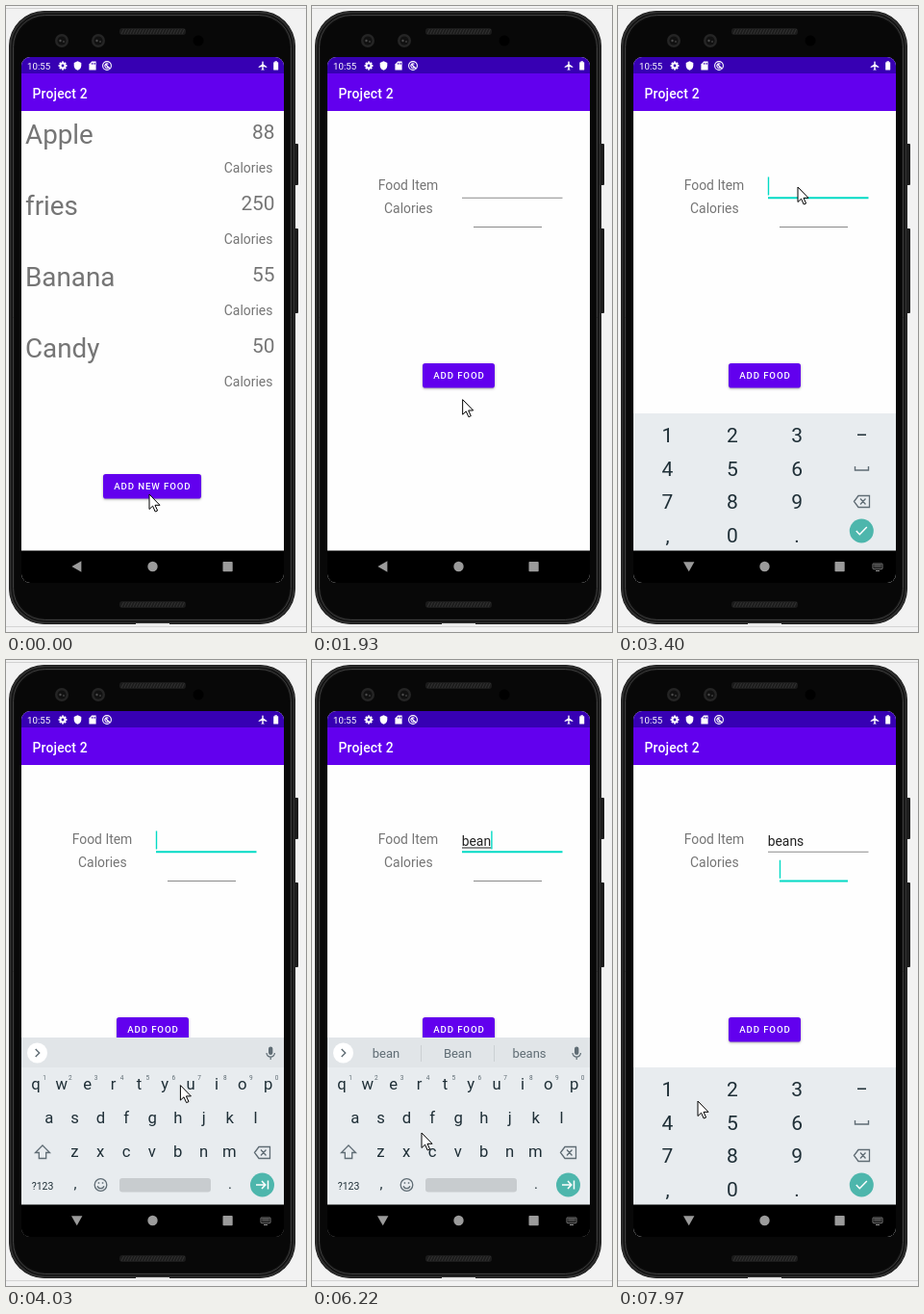
An HTML page with a canvas for the animation above (8000 ms loop, 312 by 650 pixels).

```html
<!DOCTYPE html>
<html lang="en">
<head>
<meta charset="utf-8">
<title>Food list app</title>
<style>
  html, body { margin: 0; width: 100%; height: 100%; overflow: hidden; background: #f2f2f2; }
  canvas { display: block; width: 312px; height: 650px; }
</style>
</head>
<body>
<canvas id="stage"></canvas>
<script>
const LOOP = 8000;
const PURPLE = '#6200ee', TEAL = '#03dac5', GREY = '#757575', KEY = '#1f2f37', ICON = '#5f6c74';
const ratio = window.devicePixelRatio || 1;
const canvas = document.getElementById('stage');
const layer = document.createElement('canvas');
for (const surface of [canvas, layer]) {
  surface.width = 312 * ratio;
  surface.height = 650 * ratio;
  surface.getContext('2d').scale(ratio, ratio);
}
let c = canvas.getContext('2d');

// ---- drawing helpers ----
function rect(x, y, w, h, color, r = 0) {
  c.fillStyle = color;
  c.beginPath();
  c.roundRect(x, y, w, h, r);
  c.fill();
}
function frame(x, y, w, h, color, width, r) {
  c.strokeStyle = color;
  c.lineWidth = width;
  c.beginPath();
  c.roundRect(x, y, w, h, r);
  c.stroke();
}
function circle(x, y, r, color) {
  c.fillStyle = color;
  c.beginPath();
  c.arc(x, y, r, 0, 7);
  c.fill();
}
function text(str, x, y, size, color, align = 'left', weight = 400, spacing = 0) {
  c.font = `${weight} ${size}px Roboto, sans-serif`;
  c.letterSpacing = spacing + 'px';
  c.textAlign = align;
  c.fillStyle = color;
  c.fillText(str, x, y);
}
// Path relative to (x, y); stroked when a width is given
function icon(x, y, d, color, width = 0) {
  c.save();
  c.translate(x, y);
  c.lineWidth = width;
  c.fillStyle = c.strokeStyle = color;
  if (width) c.stroke(new Path2D(d)); else c.fill(new Path2D(d));
  c.restore();
}
function clipTo(x, y, w, h, r) {
  c.beginPath();
  c.roundRect(x, y, w, h, r);
  c.clip();
}
// Draws a whole window, zoomed about the screen centre and faded as one
function zoomed(scale, alpha, draw) {
  const main = c;
  c = layer.getContext('2d');
  c.clearRect(0, 0, 312, 650);
  c.save();
  c.translate(152.5, 326);
  c.scale(scale, scale);
  c.translate(-152.5, -326);
  clipTo(16, 53, 273, 546, 0);
  draw();
  c.restore();
  c = main;
  c.globalAlpha = alpha;
  c.drawImage(layer, 0, 0, 312, 650);
  c.globalAlpha = 1;
}

// ---- phone ----
function grille(y) {
  rect(118, y, 69, 7, '#1b1b1b', 3);
  for (let x = 120; x < 186; x += 3) icon(x, y + 1, 'M0 5L2.5 0', '#3a3a3a', 0.8);
}
function phone() {
  rect(0, 0, 312, 650, '#f2f2f2');
  rect(0, 2, 312, 1, '#d0d0d0');
  rect(0, 644, 312, 1, '#d4d4d4');
  rect(300, 143, 4, 43, '#1c1c1c', 1);
  rect(300, 231, 4, 88, '#1c1c1c', 1);
  rect(3, 5, 298, 637, '#111', 37);
  frame(4.5, 6.5, 295, 634, '#2e2e2e', 2, 36);
  frame(7.5, 9.5, 289, 628, '#4a4a4a', 0.8, 33);
  rect(9, 11, 286, 625, '#080808', 32);
  rect(135, 641, 35, 2, '#e6e6e6');
  grille(23);
  grille(618);
  for (const x of [58, 96]) {
    circle(x, 36, 7, '#252525');
    circle(x, 36, 4.5, '#111');
    circle(x - 1.5, 36, 1.2, '#4c4c4c');
    circle(x + 2, 37, 1, '#3c3c3c');
  }
  circle(200, 36, 5.5, '#000');
}

// ---- app windows ----
function appWindow() {
  rect(16, 53, 273, 546, '#fefefe');
  rect(16, 53, 273, 17.5, '#3700b3');
  rect(16, 70, 273, 39, PURPLE);
  text('Project 2', 27.5, 95.8, 13.9, '#fff', 'left', 500, 0.2);
  rect(16, 565.5, 273, 34, '#000');
}
function button(label, x, y, w, ripple = 0) {
  c.save();
  c.shadowColor = 'rgba(0,0,0,.35)';
  c.shadowBlur = (ripple ? 5 : 2.5) * ratio;
  c.shadowOffsetY = (ripple ? 2 : 1) * ratio;
  rect(x, y, w, 25.5, PURPLE, 2.8);
  c.restore();
  if (ripple) {
    c.save();
    clipTo(x, y, w, 25.5, 2.8);
    circle(149, 507, ripple, 'rgba(255,255,255,.24)');
    c.restore();
  }
  text(label, x + w / 2 + 0.4, y + 16.4, 9.7, '#fff', 'center', 500, 0.87);
}
function listWindow(ripple) {
  appWindow();
  [['Apple', 88], ['fries', 250], ['Banana', 55], ['Candy', 50]].forEach(([food, calories], i) => {
    const y = 74 * i;
    text(food, 20, 142.7 + y, 27.8, GREY);
    text(calories, 279.5, 138 + y, 20.8, GREY, 'right');
    text('Calories', 277.3, 172.6 + y, 13.9, GREY, 'right');
  });
  button('ADD NEW FOOD', 101, 486, 102, ripple);
}
function field(x, w, y, focused, value) {
  rect(x, focused ? y - 1 : y - 0.5, w, focused ? 2 : 1, focused ? TEAL : '#8a8a8a');
  text(value, x - 0.3, y - 6.3, 13.9, '#212121');
  if (!focused) return;
  const end = c.measureText(value).width;
  rect(x, y - 4.8, end, 1, '#212121');
  rect(x + end - 0.2, y - 21.8, 1.4, 19, TEAL);
}
function formWindow(focus, value) {
  appWindow();
  text('Food Item', 100, 191.4, 13.9, GREY, 'center');
  text('Calories', 100.3, 215, 13.9, GREY, 'center');
  field(156, 104.5, 199.3, focus === 'food', value);
  field(168, 71, 229.5, focus === 'calories', '');
  button('ADD FOOD', 115, 371, 75);
}

// ---- keyboards ----
function backspace(x, y) {
  icon(x, y, 'M-8 0L-3.5-6H8V6H-3.5ZM-1.5-3L4 3M4-3L-1.5 3', ICON, 1.3);
}
function numberPad() {
  rect(16, 423, 273, 177, '#e8ecef');
  ['123', '456', '789', ',0.'].forEach((row, r) => [...row].forEach((key, i) =>
    text(key, 51.5 + 67.3 * i, 453 + 34.6 * r, 21, KEY, 'center')));
  rect(249, 444.5, 9, 1.6, KEY);
  icon(253.5, 480, 'M-7-2V2H7V-2', ICON, 1.4);
  backspace(253.5, 514.5);
  circle(253.3, 545, 12.5, '#4db6ac');
  icon(253.3, 545, 'M-5.5 0L-2 3.7L5.5-4', '#fff', 1.5);
}
const ROWS = [['qwertyuiop', 31, 446], ['asdfghjkl', 44.7, 481], ['zxcvbnm', 71.3, 516]];
function letterKeys(words, pressed) {
  rect(16, 392, 273, 174, '#e8ecef');
  rect(16, 392, 273, 31, '#e1e5e8');
  circle(32.5, 408, 10.5, '#fff');
  icon(32.5, 408, 'M-1.8-4L2.2 0L-1.8 4', ICON, 1.4);
  words.forEach((word, i) => text(word, 77 + 74.5 * i, 412.8, 13, ICON, 'center'));
  if (words.length) for (const x of [113, 189]) rect(x, 400, 1, 17, '#cbd0d3');
  rect(273, 401.5, 4.4, 8.5, ICON, 2.2);
  icon(275.2, 408, 'M-4.2 0A4.2 4.2 0 0 0 4.2 0M0 4V7', ICON, 1.2);
  for (const [row, x0, y] of ROWS) [...row].forEach((key, i) => {
    const x = x0 + 26.85 * i;
    if (key === pressed) rect(x - 13, y - 22, 26, 35, '#d3d8db', 3);
    text(key, x, y, 16.7, KEY, 'center');
    if (y === 446) text((i + 1) % 10, x + 9, 435.5, 6.5, ICON, 'center');
  });
  icon(38, 511, 'M0-7L7.5 0.5H3.7V6.5H-3.7V0.5H-7.5Z', ICON, 1.3);
  backspace(266.5, 511.5);
  text('?123', 38, 549.5, 10.5, KEY, 'center');
  text(',', 72, 549, 15, KEY, 'center');
  text('.', 233, 549, 15, KEY, 'center');
  icon(98.5, 545, 'M6.3 0A6.3 6.3 0 1 1-6.3 0A6.3 6.3 0 1 1 6.3 0M-3.4 1.3A3.6 3.6 0 0 0 3.4 1.3M-2.8-2h1.5M1.3-2h1.5', ICON, 1.3);
  rect(118, 538, 95, 14.5, '#c8cccf', 3);
  circle(266.5, 545, 12.5, '#4db6ac');
  icon(266.5, 545, 'M-6.5 0H3M-0.5-4L3.3 0L-0.5 4M6-4.5V4.5', '#fff', 1.5);
}

// ---- system bars ----
function statusBar() {
  text('10:55', 22, 66, 9.7, '#fff');
  for (let a = 0; a < 4; a++) {
    const dx = 4.4 * Math.cos(a * Math.PI / 4), dy = 4.4 * Math.sin(a * Math.PI / 4);
    icon(59, 62, `M${-dx} ${-dy}L${dx} ${dy}`, '#fff', 2);
  }
  circle(59, 62, 3.5, '#fff');
  circle(59, 62, 1.4, '#3700b3');
  icon(74.5, 62, 'M0-4.7L3.8-3V0Q3.6 3.4 0 4.8Q-3.6 3.4-3.8 0V-3Z', '#fff');
  icon(90, 62, 'M-3.6-1.6L-0.8-4.4H3.6V4.4H-3.6Z', '#fff');
  for (const x of [88.8, 90.5, 92]) rect(x, 59, 0.8, 1.8, '#3700b3');
  icon(105, 62, 'M4.4 0A4.4 4.4 0 1 1-4.4 0A4.4 4.4 0 1 1 4.4 0M2 1A2.2 2.2 0 1 1 1.5-1.6M-1.5-1.5L3 3', '#fff', 1.1);
  icon(267, 62, 'M-0.7-4.2Q0-5 0.7-4.2V-1.4L4.3 1V2L0.7 0.9V3.2L1.8 4.4H-1.8L-0.7 3.2V0.9L-4.3 2V1L-0.7-1.4Z', '#fff');
  rect(278.2, 58.2, 5, 8.4, '#fff', 0.6);
  rect(279.5, 57.2, 2.4, 1.5, '#fff');
}
// turn: 0 = back arrow, 1 = arrow pointing down while a keyboard is open
function navBar(turn, color) {
  c.save();
  c.translate(73.7, 582);
  c.rotate(-turn * Math.PI / 2);
  icon(0, 0, 'M-5.3 0L4.7-5.7V5.7Z', color);
  c.restore();
  circle(152.5, 582, 5.2, color);
  rect(225.5, 577, 10.2, 10.2, color, 0.8);
  if (turn) {
    frame(265, 579, 10, 5.6, color, 0.8, 0.5);
    icon(270, 580.7, 'M-3.8 0H3.8M-3.8 1.6H3.8', color, 0.8);
    rect(268, 586, 4, 1, color);
  }
}

// ---- timeline ----
// The screen updates eight times between consecutive marks
const MARKS = [1540, 2590, 3640, 4690, 5830, 6920, 7970, 9020];
function tickAt(t) {
  if (t < 1540) return t < 1120 ? -3 : t < 1270 ? -2 : -1;
  const i = MARKS.findLastIndex(mark => mark <= t);
  return 8 * i + Math.floor(8 * (t - MARKS[i]) / (MARKS[i + 1] - MARKS[i]) + 0.15);
}
// Pointer stops: tick, x, y
const POINTER = [
  [0, 149, 507], [2, 149, 507], [5, 172, 212], [7, 174, 211], [8, 177, 195], [11, 187, 188],
  [15, 187, 188], [20, 180, 505], [23, 180, 508], [25, 88, 445], [27, 86, 444], [29, 44, 474],
  [30, 44, 474], [32, 203, 510], [33, 203, 510], [35, 114, 491], [36, 72, 476], [38, 72, 476],
  [41, 178, 212], [45, 178, 212], [47, 109, 387], [48, 83, 458]
];
function pointer(tick) {
  const n = Math.min(48, Math.max(0, tick));
  const i = Math.max(1, POINTER.findIndex(stop => stop[0] >= n));
  const [n0, x0, y0] = POINTER[i - 1], [n1, x1, y1] = POINTER[i];
  const f = (n - n0) / (n1 - n0);
  const x = x0 + (x1 - x0) * f, y = y0 + (y1 - y0) * f;
  const arrow = 'M0 0V15.5L3.6 12.2L6.2 18L8.6 17L6 11.3H11Z';
  icon(x, y, arrow, '#fff');
  icon(x, y, arrow, '#000', 1);
}
// Tick at which each letter lands, and the suggestions that follow
const TYPING = [
  [15, '', []], [22, 'b', ['b', 'be', 'but']], [27, 'be', ['be', 'been', 'best']],
  [30, 'bea', ['bea', 'bear', 'beach']], [33, 'bean', ['bean', 'Bean', 'beans']],
  [37, 'beans', ['beans', 'Beans', 'bean']]
];
const PAD_RISES = 8, FOOD_FOCUS = 12, LETTERS_OPEN = 15, CALORIES_FOCUS = 42;

function formScreen(n) {
  const [, value, words] = TYPING.findLast(step => step[0] <= n) || TYPING[0];
  const next = TYPING.find(step => step[0] === n + 1);
  const focus = n >= CALORIES_FOCUS ? 'calories' : n >= FOOD_FOCUS ? 'food' : n >= 6 ? 'calories' : '';
  formWindow(focus, value);
  if (n === PAD_RISES) {
    rect(16, 565.5, 273, 34, '#fefefe');
    c.save();
    c.translate(0, 34);
    c.globalAlpha = 0.65;
    numberPad();
    c.restore();
    rect(16, 565.5, 273, 34, 'rgba(0,0,0,.4)');
  } else if (n > PAD_RISES) {
    if (n >= LETTERS_OPEN && n < CALORIES_FOCUS) letterKeys(words, next && next[1].slice(-1));
    else numberPad();
    rect(16, 565.5, 273, 34, '#000');
  }
}
function render(t) {
  const n = tickAt(t);
  phone();
  c.save();
  clipTo(16, 53, 273, 546, 9);
  if (n < 0) listWindow([0, 45, 110][n + 3]);
  else if (n === 0) {
    zoomed(1.0355, 1, () => listWindow(0));
    zoomed(0.957, 0.8, () => formWindow('', ''));
  } else if (n === 1) {
    rect(16, 53, 273, 546, '#000');
    zoomed(0.99, 1, () => formWindow('', ''));
  } else formScreen(n);
  statusBar();
  if (n === 0) rect(16, 574, 273, 26, '#000');
  navBar(n < PAD_RISES ? 0 : n === PAD_RISES ? 0.6 : 1, n === PAD_RISES ? '#e4e4e4' : '#9b9b9b');
  c.restore();
  pointer(n);
}

const start = performance.now();
function tick() {
  render((performance.now() - start) % LOOP);
  requestAnimationFrame(tick);
}
tick();
</script>
</body>
</html>
```
